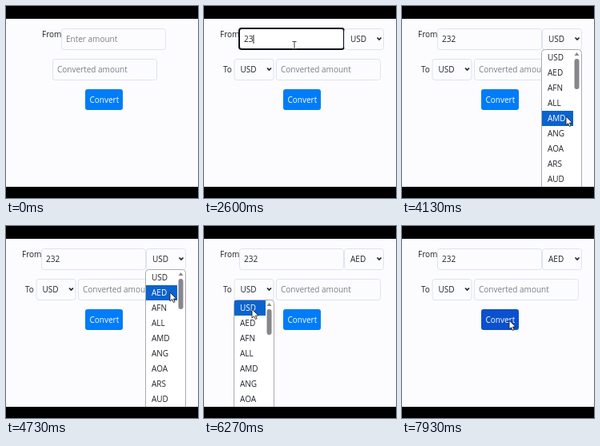
Write an HTML page with a canvas that moves like this. It is 240 px wide and 240 px high and loops after 8 s.

```html
<!DOCTYPE html>
<html lang="en">
<head>
<meta charset="utf-8">
<title>Currency converter</title>
<style>
  html, body { margin: 0; width: 100%; height: 100%; overflow: hidden; background: #000; }
  canvas { display: block; width: 240px; height: 240px; }
</style>
</head>
<body>
<canvas id="stage"></canvas>
<script>
const LOOP = 8000;
const ROW = 19;
const INK = '#20242a', HINT = '#7b7f84', PAGE = '#fcfcfe', EDGE = '#dde3f1';
const CODES = ['USD', 'AED', 'AFN', 'ALL', 'AMD', 'ANG', 'AOA', 'ARS', 'AUD', 'AWG'];

// Moments of the interaction, in ms
const LOADED = 330, FOCUS = 800, KEYS = [2200, 2470, 2800];
const FROM_OPEN = 3530, FROM_PICK = 4800;
const TO_OPEN = 5800, TO_PICK = 6670, PRESS = 7530;

// Pointer stops: time, x, y
const PATH = [
  [530, 128, 64], [760, 113, 45], [950, 113, 45], [1400, 139, 79], [1620, 139, 79],
  [2000, 113, 49], [2900, 113, 49], [3400, 205, 43], [3600, 205, 43], [4130, 205, 138],
  [4260, 205, 138], [4640, 205, 83], [4850, 205, 83], [5400, 55, 82], [5860, 55, 82],
  [6200, 60, 104], [6720, 60, 104], [7350, 134, 118], [LOOP, 134, 118]
];

const canvas = document.getElementById('stage');
const ctx = canvas.getContext('2d');
const scale = window.devicePixelRatio || 1;
canvas.width = canvas.height = 240 * scale;

function pointerAt(t) {
  const next = PATH.findIndex(stop => stop[0] > t);
  if (next < 1) return null;
  const [t0, x0, y0] = PATH[next - 1], [t1, x1, y1] = PATH[next];
  const u = (t - t0) / (t1 - t0), k = u * u * (3 - 2 * u);
  return { x: x0 + (x1 - x0) * k, y: y0 + (y1 - y0) * k };
}

function text(str, x, baseline, color = INK) {
  ctx.fillStyle = color;
  ctx.font = '10px "Open Sans", "Noto Sans", sans-serif';
  ctx.fillText(str, x, baseline);
}

function box(x, y, w, h, radius, fill, stroke, width = 1) {
  ctx.beginPath();
  ctx.roundRect(x, y, w, h, radius);
  if (fill) { ctx.fillStyle = fill; ctx.fill(); }
  if (stroke) { ctx.strokeStyle = stroke; ctx.lineWidth = width; ctx.stroke(); }
}

function polygon(points, fill, stroke, width = 1) {
  ctx.beginPath();
  points.forEach(([x, y]) => ctx.lineTo(x, y));
  if (fill) { ctx.closePath(); ctx.fillStyle = fill; ctx.fill(); }
  if (stroke) { ctx.strokeStyle = stroke; ctx.lineWidth = width; ctx.stroke(); }
}

function field(x, y, w, focused) {
  if (focused) box(x, y, w, 26, 3, '#fff', '#10131a', 2);
  else box(x + .5, y + .5, w - 1, 26, 3, PAGE, EDGE);
}

function select(x, y, code, focused) {
  field(x, y, 50, focused);
  text(code, x + 8, y + 17);
  polygon([[x + 41.5, y + 11.5], [x + 44, y + 14], [x + 46.5, y + 11.5]], null, INK, 1.7);
}

function dropdown(x, y, thumb, pointer) {
  const active = Math.max(0, Math.floor((pointer.y - y - 1) / ROW));
  box(x + .5, y + .5, 50, 180, 4, '#fff', '#a8abb2');
  CODES.forEach((code, i) => {
    const top = y + 1 + i * ROW;
    if (i === active) box(x + 1, top, 39, ROW, 0, '#0b63ce');
    text(code, x + 8, top + 13, i === active ? '#fff' : INK);
  });
  polygon([[x + 41.5, y + 8], [x + 44.5, y + 4], [x + 47.5, y + 8]], '#85878b');
  box(x + 41.5, y + 12, 6, thumb, 3, '#85878b');
}

function arrow({ x, y }) {
  const shape = [[0, 0], [0, 11], [2.6, 8.7], [4.3, 12.5], [6.1, 11.7], [4.5, 8], [8, 8], [0, 0]];
  polygon(shape.map(([dx, dy]) => [x + dx, y + dy]), '#fff', '#222', .9);
}

function beam({ x, y }) {
  ctx.fillStyle = '#444';
  ctx.fillRect(x - .5, y - 5, 1, 10);
  ctx.fillRect(x - 2.5, y - 5, 5, 1);
  ctx.fillRect(x - 2.5, y + 4, 5, 1);
}

function draw(t) {
  const loaded = t >= LOADED;
  const fromOpen = t >= FROM_OPEN && t < FROM_PICK;
  const toOpen = t >= TO_OPEN && t < TO_PICK;
  const typing = t >= FOCUS && t < FROM_OPEN;
  const pointer = pointerAt(t);
  const typed = '232'.slice(0, KEYS.filter(key => t >= key).length);
  const amountX = loaded ? 44 : 69, resultX = loaded ? 90 : 58;

  ctx.setTransform(scale, 0, 0, scale, 0, 0);
  ctx.fillStyle = '#000';
  ctx.fillRect(0, 0, 240, 240);
  ctx.save();
  ctx.beginPath();
  ctx.rect(0, 16, 240, 210);
  ctx.clip();
  ctx.fillStyle = PAGE;
  ctx.fillRect(0, 16, 240, 210);

  text('From', amountX - 24, 39);
  field(amountX, 28, 131, typing);
  text(typed || 'Enter amount', amountX + 6, 45, typed ? INK : HINT);
  const lastEdit = [FOCUS, ...KEYS].filter(key => t >= key).pop();
  if (typing && (t - lastEdit) % 1060 < 530) {
    ctx.fillStyle = INK;
    ctx.fillRect(amountX + 6 + ctx.measureText(typed).width, 36, 1, 11);
  }

  field(resultX, 66, 131);
  text('Converted amount', resultX + 6, 83, HINT);

  if (loaded) {
    select(175, 28, t < FROM_PICK ? 'USD' : 'AED', t >= FROM_PICK && t < TO_OPEN);
    text('To', 24, 83);
    select(37.5, 66, 'USD', t >= TO_PICK && t < PRESS);
  }

  const hovered = pointer && !fromOpen && !toOpen &&
    pointer.x > 99 && pointer.x < 146 && pointer.y > 104 && pointer.y < 130;
  box(99, 104, 47, 26, 3, hovered ? '#0b50cc' : '#007cf8');
  text('Convert', 104.5, 121, '#fff');

  if (fromOpen) dropdown(174, 54, 38, pointer);
  if (toOpen) dropdown(37, 92, 32, pointer);

  if (pointer) {
    const overAmount = pointer.x > 44 && pointer.x < 174 && pointer.y > 28 && pointer.y < 55;
    (overAmount ? beam : arrow)(pointer);
  }
  ctx.restore();
}

function tick() {
  draw(performance.now() % LOOP);
  requestAnimationFrame(tick);
}
tick();
</script>
</body>
</html>
```
